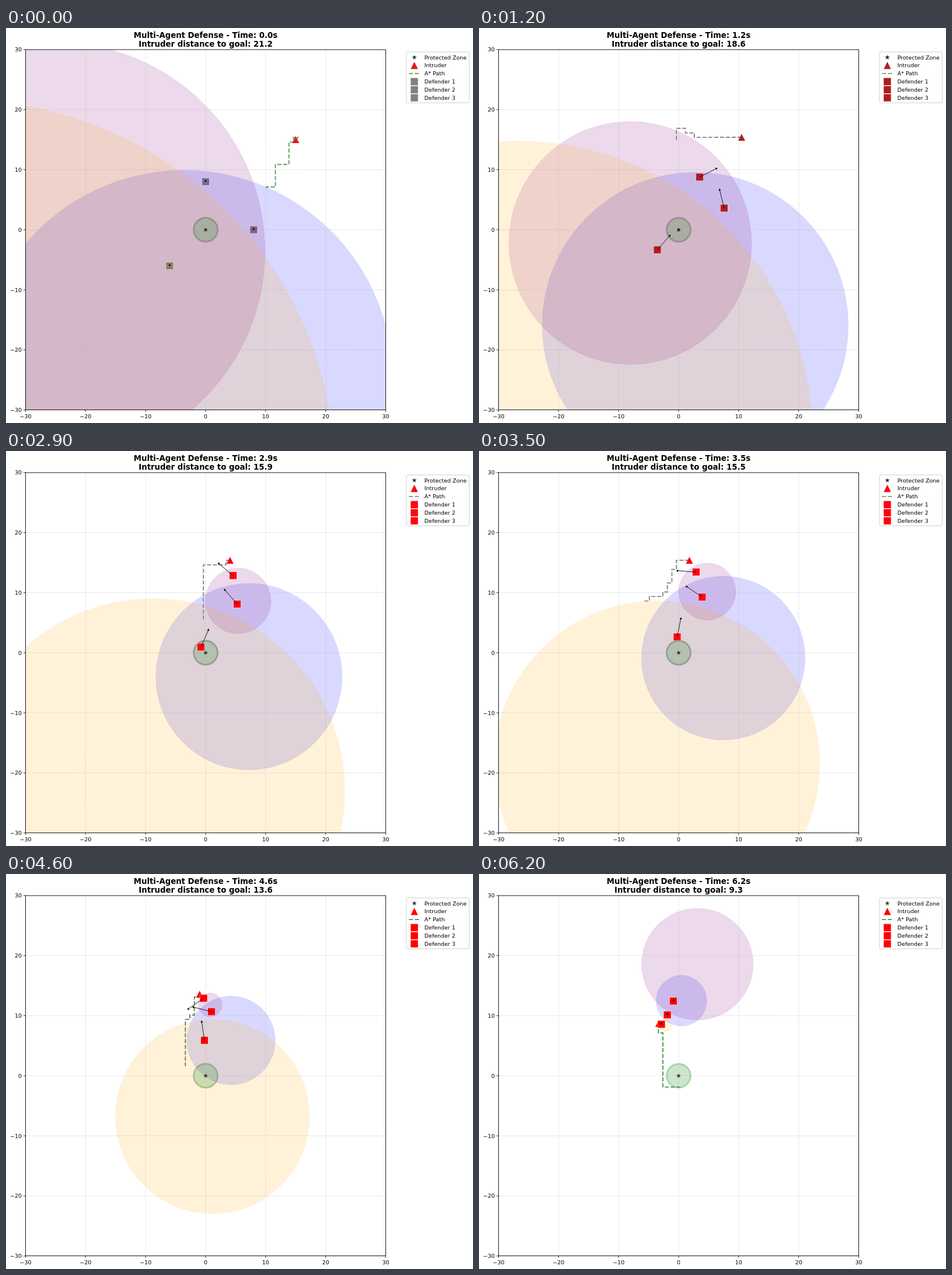
An HTML page with a canvas that plays this animation: 800x676 px, repeating every 6300 ms.

```html
<!DOCTYPE html>
<html lang="en">
<head>
<meta charset="utf-8">
<title>Multi-Agent Defense</title>
<style>
  html, body { margin: 0; height: 100%; overflow: hidden; background: #fff; }
  canvas { display: block; }
</style>
</head>
<body>
<canvas id="stage" width="800" height="676"></canvas>
<script>
const ctx = document.getElementById('stage').getContext('2d');
const LOOP = 6300, SCALE = 617 / 60, CELL = 0.75, HORIZON = 19 * CELL;
const BOX = { left: 33.5, top: 37, size: 617 };
const SPEED = 3, RATIO = 3 / 3.8;   // defender pace, Apollonius ratio
const FONT = '"DejaVu Sans", sans-serif';

// Intruder way points: time, x, y
const INTRUDER = [
  [0, 15, 15], [.1, 14.65, 15.4], [4, -.1, 15.4], [4.1, -.375, 15.2],
  [4.4, -.45, 14.1], [4.6, -1, 13.57], [4.85, -1.8, 13.1], [5.5, -1.9, 10.5],
  [5.65, -2.5, 10.1], [5.8, -2.6, 9.6], [6, -3.3, 9.4], [6.2, -3.3, 8.72]
];

// Defender knots: x, y, heading in degrees
const KNOT_TIMES = [0, 1.2, 2, 2.9, 4, 4.6, 6.2];
const DEFENDERS = [
  { color: 'blue', idle: '#7f607f', knots: [[8, 0, 90], [7.58, 3.6, 104], [6.8, 5.85, 114],
    [5.25, 8.1, 131], [2.63, 10, 154], [.97, 10.67, 166], [-1.88, 10.14, 250]] },
  { color: 'purple', idle: '#746e88', knots: [[0, 8, 0], [3.5, 8.77, 27], [5.15, 10.43, 66],
    [4.57, 12.85, 140], [1.36, 13.4, 184], [-.34, 12.9, 215], [-.88, 12.43, 45]] },
  { color: 'orange', idle: '#88805f', knots: [[-6, -6, 47], [-3.55, -3.33, 48.6], [-2.09, -1.38, 54],
    [-.78, .95, 66.5], [-.1, 4.1, 90], [-.2, 5.9, 98.4], [-2.87, 8.57, 165]] }
];

// Planned routes as corners on the search grid
const PLANS = [
  { from: 0, cells: [[20, 20], [19, 20], [19, 19], [18, 19], [18, 14], [15, 14], [15, 9], [13, 9], [13, 8]] },
  { from: .1, cells: [[3, 20], [3, 21], [1, 21], [1, 22], [-1, 22], [-1, 0]] },
  { from: 1.6, cells: [[4, 20], [4, 19], [-1, 19], [-1, 0]] },
  { from: 3.1, cells: [[-1, 20], [-1, 18], [-2, 18], [-2, 15], [-3, 15], [-3, 13], [-4, 13], [-4, 12],
    [-7, 12], [-7, 11], [-8, 11], [-8, 0]] },
  { from: 4.5, cells: [[-2, 17], [-3, 17], [-3, 13], [-4, 13], [-4, 12], [-5, 12], [-5, -3]] },
  { from: 5.9, cells: [[-5, 9], [-4, 9], [-4, -3], [0, -3]] }
];

const LOOKS = [
  { from: 0, unit: '#808080', foe: '#e31a1a', path: '#55a555', ring: 'rgba(110,115,110,.5)', star: '#1c3a1c' },
  { from: .1, unit: '#b01e1e', foe: '#b02222', path: '#888', ring: 'rgba(110,115,110,.5)', star: '#222' },
  { from: 1.6, unit: '#b82727', foe: '#b82a2a', path: '#808080', ring: 'rgba(110,115,110,.5)', star: '#333' },
  { from: 2.5, unit: '#fc0510', foe: '#fc0510', path: '#8a8a8a', ring: 'rgba(90,105,90,.45)', star: '#333' },
  { from: 4.3, unit: '#f00', foe: '#f00', path: '#66805c', ring: 'rgba(40,110,40,.3)', star: '#333' },
  { from: 5.4, unit: '#f00', foe: '#f00', path: '#459a45', ring: 'rgba(0,128,0,.25)', star: '#2c402c' }
];

const px = x => 342 + x * SCALE;
const py = y => 345.3 - y * SCALE;
const current = (list, t) => list.filter(item => item.from <= t + 1e-6).pop();

function segment(times, t) {
  let i = 0;
  while (i < times.length - 2 && t >= times[i + 1]) i++;
  return [i, (t - times[i]) / (times[i + 1] - times[i])];
}

function intruderAt(t) {
  const [i, u] = segment(INTRUDER.map(p => p[0]), t);
  const [, x0, y0] = INTRUDER[i], [, x1, y1] = INTRUDER[i + 1];
  return [x0 + (x1 - x0) * u, y0 + (y1 - y0) * u];
}

// Hermite curve through the knots, with its direction of travel
function defenderAt(knots, t) {
  const [i, u] = segment(KNOT_TIMES, t);
  const a = knots[i], b = knots[i + 1], reach = SPEED * (KNOT_TIMES[i + 1] - KNOT_TIMES[i]);
  const axis = (k, trig) => {
    const m0 = reach * trig(a[2] * Math.PI / 180), m1 = reach * trig(b[2] * Math.PI / 180);
    const d = b[k] - a[k], c2 = 3 * d - 2 * m0 - m1, c3 = m0 + m1 - 2 * d;
    return [a[k] + u * (m0 + u * (c2 + u * c3)), m0 + u * (2 * c2 + 3 * u * c3)];
  };
  const [x, dx] = axis(0, Math.cos), [y, dy] = axis(1, Math.sin);
  return { x, y, angle: Math.atan2(dy, dx) };
}

function polygon(points, color) {
  ctx.beginPath();
  points.forEach(([x, y]) => ctx.lineTo(x, y));
  ctx.closePath();
  ctx.fillStyle = color;
  ctx.fill();
}

function line(points, color, width, dash = []) {
  ctx.beginPath();
  points.forEach(([x, y]) => ctx.lineTo(x, y));
  ctx.setLineDash(dash);
  ctx.strokeStyle = color;
  ctx.lineWidth = width;
  ctx.stroke();
  ctx.setLineDash([]);
}

function text(label, x, y, align = 'left', font = '9.46px ') {
  ctx.font = font + FONT;
  ctx.textAlign = align;
  ctx.fillStyle = '#000';
  ctx.fillText(label, x, y);
}

function star(x, y, color) {
  polygon(Array.from({ length: 10 }, (_, i) => {
    const r = i % 2 ? 1.7 : 4.3, a = i * Math.PI / 5;
    return [x + r * Math.sin(a), y - r * Math.cos(a)];
  }), color);
}

function triangle(x, y, r, color) {
  polygon([[x, y - r], [x + r, y + r], [x - r, y + r]], color);
}

function square(x, y, r, color) {
  ctx.fillStyle = color;
  ctx.fillRect(x - r, y - r, 2 * r, 2 * r);
}

function circle(x, y, r) {
  ctx.beginPath();
  ctx.arc(px(x), py(y), r * SCALE, 0, 2 * Math.PI);
}

function dominance(d, [ix, iy]) {
  const k2 = RATIO * RATIO, shift = k2 / (1 - k2);
  circle(d.x - shift * (ix - d.x), d.y - shift * (iy - d.y),
    RATIO / (1 - k2) * Math.hypot(ix - d.x, iy - d.y));
  ctx.globalAlpha = .15;
  ctx.fillStyle = ctx.strokeStyle = d.color;
  ctx.fill();
  ctx.lineWidth = .95;
  ctx.setLineDash([3.5, 1.5]);
  ctx.stroke();
  ctx.setLineDash([]);
  ctx.globalAlpha = 1;
}

function route(t, [ix, iy], color) {
  const corners = current(PLANS, t).cells.map(c => c.map(n => (n + .5) * CELL));
  while (corners.length > 1 && (corners[0][0] > ix + .4 || corners[0][1] > iy + .4)) corners.shift();
  const points = [[ix, iy]];
  let left = HORIZON;
  for (const [x, y] of corners) {
    const [x0, y0] = points[points.length - 1];
    const length = Math.hypot(x - x0, y - y0), part = Math.min(1, left / (length || 1));
    points.push([x0 + (x - x0) * part, y0 + (y - y0) * part]);
    left -= length;
    if (left <= 0) break;
  }
  line(points.map(([x, y]) => [px(x), py(y)]), color, 1.9, [7, 3]);
}

function arrow(x, y, angle, length) {
  const at = (along, side) => [
    px(x + along * Math.cos(angle) - side * Math.sin(angle)),
    py(y + along * Math.sin(angle) + side * Math.cos(angle))];
  if (length) line([at(0, 0), at(length, 0)], '#111', .95);
  polygon([at(length, .2), at(length + .35, 0), at(length, -.2)], '#000');
}

function legend(look) {
  const row = i => 50.2 + 13.85 * i;
  ctx.beginPath();
  ctx.roundRect(686, 41, 107.5, 87, 2);
  ctx.strokeStyle = '#ccc';
  ctx.lineWidth = .95;
  ctx.stroke();
  star(699.5, row(0), look.star);
  triangle(699.5, row(1), 6.2, look.foe);
  line([[690.3, row(2)], [708.5, row(2)]], look.path, 1.9, [7, 3]);
  [3, 4, 5].forEach(i => square(699.5, row(i), 6.2, look.unit));
  ['Protected Zone', 'Intruder', 'A* Path', 'Defender 1', 'Defender 2', 'Defender 3']
    .forEach((label, i) => text(label, 716.8, row(i) + 3.4));
}

function draw(t) {
  const look = current(LOOKS, t), foe = intruderAt(t);
  const still = t === 0 || t > 6.15;
  const units = DEFENDERS.map(d => ({ ...d, ...defenderAt(d.knots, t) }));
  const right = BOX.left + BOX.size, bottom = BOX.top + BOX.size - .5;

  ctx.fillStyle = '#fff';
  ctx.fillRect(0, 0, 800, 676);

  ctx.save();
  ctx.beginPath();
  ctx.rect(BOX.left, BOX.top, BOX.size, bottom - BOX.top);
  ctx.clip();
  units.forEach(d => dominance(d, foe));
  circle(0, 0, 2);
  ctx.fillStyle = 'rgba(0,128,0,.2)';
  ctx.fill();
  ctx.strokeStyle = look.ring;
  ctx.lineWidth = 2.8;
  ctx.stroke();
  for (let v = -20; v <= 20; v += 10) {
    line([[px(v), BOX.top], [px(v), bottom]], 'rgba(176,176,176,.3)', .95);
    line([[BOX.left, py(v)], [right, py(v)]], 'rgba(176,176,176,.3)', .95);
  }
  route(t, foe, look.path);
  star(px(0), py(0), look.star);
  triangle(px(foe[0]), py(foe[1]), 6, look.foe);
  units.forEach(d => {
    square(px(d.x), py(d.y), 6.7, 'rgba(255,255,255,.6)');
    square(px(d.x), py(d.y), 6.1, t === 0 ? d.idle : look.unit);
  });
  units.forEach(d => arrow(d.x, d.y, still ? Math.PI / 2 : d.angle, still ? 0 : SPEED));
  ctx.restore();

  ctx.strokeStyle = '#000';
  ctx.lineWidth = .9;
  ctx.strokeRect(BOX.left, BOX.top, BOX.size, bottom - BOX.top);
  for (let v = -30; v <= 30; v += 10) {
    const label = String(v).replace('-', '\u2212');
    line([[px(v), bottom], [px(v), bottom + 3.5]], '#000', .8);
    line([[BOX.left - 3.5, py(v)], [BOX.left, py(v)]], '#000', .8);
    text(label, px(v), 667.5, 'center');
    text(label, 27, py(v) + 3.5, 'right');
  }

  text(`Multi-Agent Defense - Time: ${t.toFixed(1)}s`, 342, 17.2, 'center', 'bold 13.27px ');
  text(`Intruder distance to goal: ${Math.hypot(...foe).toFixed(1)}`, 342, 31.7, 'center', 'bold 13.27px ');
  legend(look);
}

function tick() {
  draw(Math.floor(performance.now() % LOOP / 100) / 10);
  requestAnimationFrame(tick);
}
tick();
</script>
</body>
</html>
```
